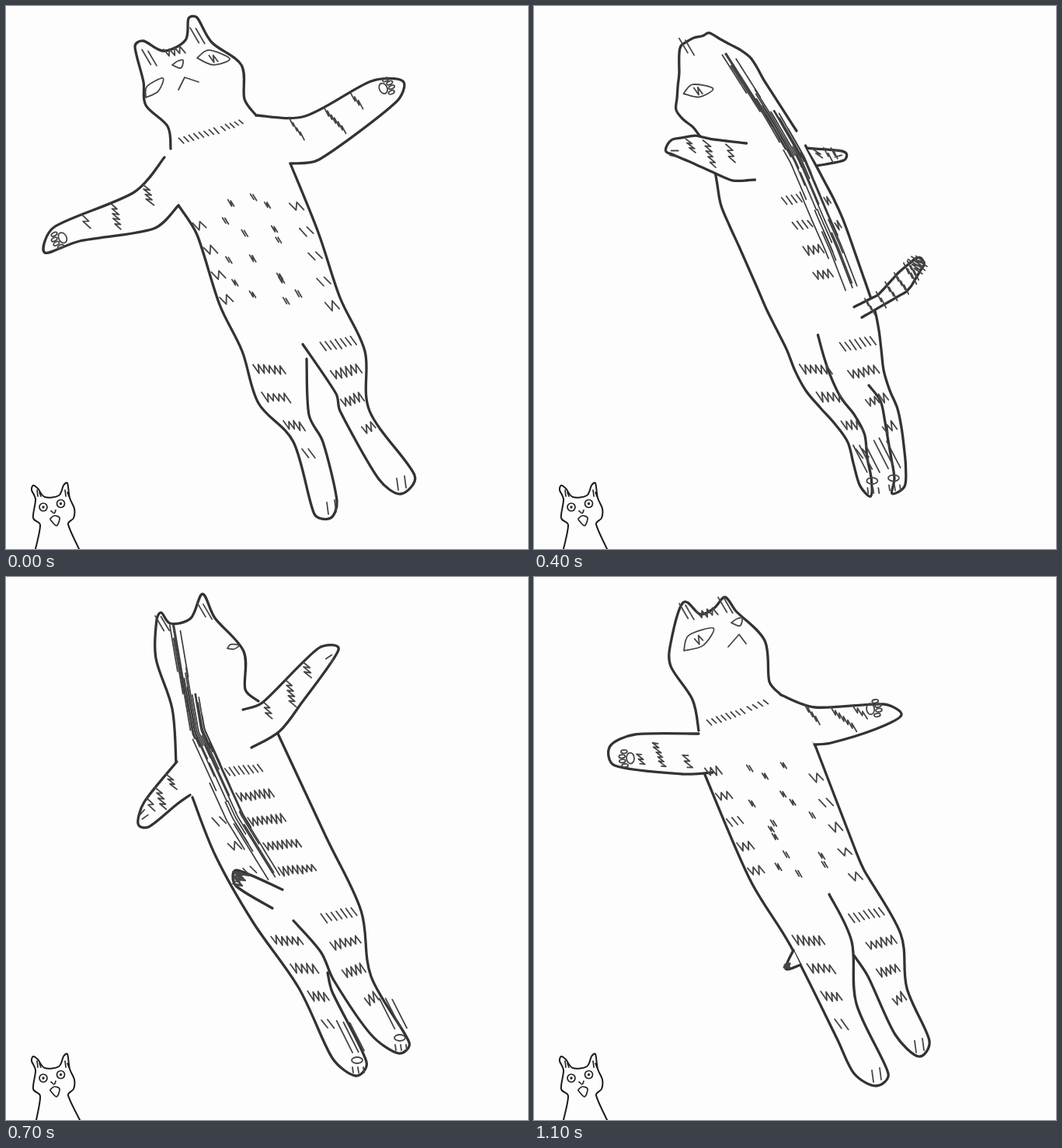
Animation of 672 by 700 pixels, one loop 1.2 s. Source, as an HTML page with a canvas:

```html
<!DOCTYPE html>
<html lang="en">
<head>
<meta charset="utf-8">
<title>Spinning cat</title>
<style>
html, body { margin: 0; width: 100%; height: 100%; overflow: hidden; background: #fefdfe; }
canvas { display: block; }
</style>
</head>
<body>
<canvas id="c" width="672" height="700"></canvas>
<script>
const ctx = document.getElementById('c').getContext('2d');
const STEP = 100, PAPER = '#fefdfe';

const pairs = s => {
  const n = s.split(' ').map(Number);
  return n.filter((_, i) => i % 2 === 0).map((x, i) => [x, n[i * 2 + 1]]);
};

// Each part is a row of points: head, left, right, armA, armB, tail, spine, eyes (ends), nose, mouth, ears.
// bands: stripe width at the left and right of the trunk; fold: side that runs back up on itself.
function pose(view, bands, parts, fold) {
  const out = { view, bands };
  for (const k in parts) out[k] = pairs(parts[k]);
  if (fold) out[fold] = out[fold].concat(out[fold].slice(-5, -1).reverse());
  return out;
}

const front = pose('front', [14, 14], {
  head: '212 184 208 155 180 128 177 98 166 52 177 45 203 58 231 44 235 16 246 15 265 47 303 76 307 120 322 141',
  armA: '322 141 385 142 470 97 511 97 502 124 403 198 366 203',
  armB: '204 195 165 240 62 285 50 318 95 303 190 287 222 257',
  left: '222 257 246 295 275 385 304 445 325 512 370 562 397 655 418 660 426 638 408 562 390 527 387 455',
  right: '366 203 402 292 430 376 462 445 468 522 526 605 508 629 480 610 430 522 425 500 382 436',
  eyes: '246 67 288 68 180 118 202 93',
  nose: '221 75',
  mouth: '222 108 230 92 248 98',
  ears: '184 66 246 38'
});

const frontLeft = pose('front', [12, 32], {
  head: '222 183 200 152 180 125 179 95 186 82 176 62 190 56 198 60 216 47 219 25 276 56 296 88 302 118 327 154',
  armA: '312 160 332 154 385 97 425 85 433 108 385 175 355 202',
  armB: '222 186 204 240 135 308 133 328 160 329 225 288 240 272',
  left: '231 257 280 362 314 430 334 515 385 570 412 635 428 651 444 635 423 562 402 498',
  right: '364 200 428 350 455 450 497 575 511 605 496 638 470 610 445 540 400 488 366 418',
  tail: '450 433 475 444 453 454',
  eyes: '216 81 270 68',
  nose: '191 94',
  mouth: '203 119 202 104 220 107',
  ears: '186 66 226 38'
});

const sideLeft = pose('side', [0, 45], {
  head: '221 158 204 157 180 140 176 125 183 110 186 78 198 63 187 27 222 43 270 53 294 95 324 146',
  armA: '297 164 255 129 226 140 246 170 272 214 291 217',
  left: '221 158 222 222 246 275 282 365 322 422 340 480 360 505 412 545 430 630 440 638 423 590 415 540 372 508 345 470 328 428',
  right: '324 146 385 260 440 388 446 480 461 512 464 590 460 632 440 639',
  tail: '442 386 500 379 585 319 595 338 540 382 444 409',
  spine: '280 66 328 152 388 286 431 374',
  eyes: '194 108 249 92',
  mouth: '194 143 204 145 212 141',
  ears: '203 44'
}, 'right');

const backLeft = pose('back', [45, 26], {
  head: '227 195 215 162 189 140 186 95 190 83 174 50 206 60 228 46 230 26 250 44 290 80 303 105 352 176',
  armA: '250 190 190 203 122 207 110 230 235 240 278 231',
  armB: '345 172 425 178 446 186 440 203 390 214 372 217',
  left: '240 240 270 320 313 408 336 485 388 543 408 620 420 642 438 625 434 550 412 490 403 420',
  right: '375 214 412 285 440 395 456 480 485 545 498 605 478 622 455 575 433 510 416 498',
  tail: '382 390 392 340 408 323 420 350 400 394',
  spine: '225 52 320 185 366 300 382 355',
  eyes: '191 118 212 121',
  ears: '189 60 239 38'
});

const backRight = pose('back', [14, 45], {
  head: '219 240 214 170 193 105 194 55 200 46 212 60 238 53 253 22 269 53 306 96 308 145 325 160',
  armA: '220 238 178 290 170 318 184 322 220 293 237 281',
  armB: '305 171 330 162 402 92 428 94 380 163 352 199 316 220',
  left: '240 284 270 360 318 445 377 530 420 620 450 643 464 625 420 535 414 510',
  right: '350 202 412 335 457 430 470 515 519 600 505 614 470 590 422 520 405 483 370 443',
  tail: '343 427 296 398 297 378 356 403',
  spine: '221 58 245 200 295 310 343 388',
  eyes: '285 92 300 88',
  ears: '201 60 255 43'
});

const sideRight = pose('side', [52, 0], {
  head: '200 160 174 113 174 90 195 52 208 10 226 42 262 50 272 65 298 76 294 102 287 121 326 165',
  armB: '235 190 238 135 260 111 276 130 288 198 277 215',
  left: '200 160 228 272 300 440 345 490 378 538 440 605 468 622 486 602',
  right: '326 165 388 285 407 370 425 420 436 460 428 522 465 580 480 608 470 575 438 525 444 465 438 430 405 380',
  tail: '314 457 275 490 160 518 152 500 255 482 297 445',
  spine: '178 90 207 200 249 325 297 435',
  eyes: '219 97 266 72',
  mouth: '277 103 284 97 294 96',
  ears: '209 36'
}, 'left');

const frontRight = pose('front', [18, 14], {
  head: '212 198 204 158 176 115 176 85 192 33 214 48 232 40 246 26 260 44 297 82 303 135 318 152',
  armA: '318 152 362 168 450 164 473 178 440 196 382 214 361 216',
  armB: '230 252 190 254 104 243 98 218 130 203 212 202',
  left: '218 250 278 390 330 475 390 595 412 640 440 656 456 640 415 550 409 470 380 409',
  right: '360 212 413 350 425 378 472 460 480 530 509 598 495 618 465 590 430 515 412 488',
  tail: '343 500 324 505 334 481',
  eyes: '193 95 231 66',
  nose: '261 58',
  mouth: '250 90 264 74 273 86',
  ears: '196 44 246 36'
});

const lerp = (a, b, f) => a.map((v, i) => v + (b[i] - v) * f);
const mid = (a, b) => lerp(a, b, .5);

// n points evenly spaced along a polyline
function resample(p, n) {
  const run = [0];
  for (let i = 1; i < p.length; i++)
    run.push(run[i - 1] + Math.hypot(p[i][0] - p[i - 1][0], p[i][1] - p[i - 1][1]));
  const total = run[run.length - 1], out = [];
  for (let i = 0, j = 1; i < n; i++) {
    const d = total * i / (n - 1);
    while (j < p.length - 1 && run[j] < d) j++;
    out.push(lerp(p[j - 1], p[j], (d - run[j - 1]) / (run[j] - run[j - 1] || 1)));
  }
  return out;
}

// pose halfway between two others; an arm only one of them shows is drawn short
function between(a, b) {
  const out = { view: a.view === 'side' ? b.view : a.view, bands: mid(a.bands, b.bands) };
  for (const k of Object.keys({ ...a, ...b })) {
    if (k in out) continue;
    const p = a[k], q = b[k];
    if (p && q) {
      const small = p.length < 3 || q.length < 3 || k === 'eyes';
      const n = small ? Math.min(p.length, q.length) : 26;
      const [u, v] = small ? [p, q] : [resample(p, n), resample(q, n)];
      out[k] = u.slice(0, n).map((pt, i) => mid(pt, v[i]));
    } else if (k.startsWith('arm')) {
      const arm = p || q, root = mid(arm[0], arm[arm.length - 1]);
      out[k] = arm.map(pt => lerp(root, pt, .5));
    }
  }
  return out;
}

const rear = between(backLeft, backRight);
delete rear.eyes;

const poses = [
  front, frontLeft, between(frontLeft, sideLeft),
  sideLeft, between(sideLeft, backLeft),
  backLeft, rear, backRight,
  between(backRight, sideRight), sideRight,
  between(sideRight, frontRight), frontRight
];

let seed;
const rnd = () => (seed = seed * 16807 % 2147483647) / 2147483647;

function pen(width, color) {
  ctx.lineWidth = width;
  ctx.strokeStyle = color;
}

function curve(p, fill) {
  ctx.beginPath();
  ctx.moveTo(...p[0]);
  for (let i = 0; i < p.length - 1; i++) {
    const a = p[i - 1] || p[i], b = p[i], c = p[i + 1], d = p[i + 2] || c;
    const len = Math.hypot(c[0] - b[0], c[1] - b[1]);
    // keep tangents short beside long neighbours so that tips stay crisp
    const pull = (u, v) => Math.min(1 / 6, .36 * len / (Math.hypot(v[0] - u[0], v[1] - u[1]) || 1));
    const f = pull(a, c), g = pull(b, d);
    ctx.bezierCurveTo(b[0] + (c[0] - a[0]) * f, b[1] + (c[1] - a[1]) * f,
      c[0] - (d[0] - b[0]) * g, c[1] - (d[1] - b[1]) * g, ...c);
  }
  if (fill) { ctx.fillStyle = PAPER; ctx.fill(); }
  ctx.stroke();
}

function tick(x, y, dx, dy) {
  ctx.beginPath();
  ctx.moveTo(x, y);
  ctx.lineTo(x + dx, y + dy);
  ctx.stroke();
}

function oval(x, y, rx, ry, turn = 0) {
  ctx.beginPath();
  ctx.ellipse(x, y, rx, ry, turn, 0, 7);
  ctx.stroke();
}

// zigzag from a to b, or a row of loose ticks
function scribble(a, b, h, loose) {
  const len = Math.hypot(b[0] - a[0], b[1] - a[1]);
  const steep = Math.abs(b[1] - a[1]) > 1.5 * Math.abs(b[0] - a[0]);
  const ox = steep ? h / 2 : h * .2, oy = steep ? h * .25 : h / 2;
  const count = 2 * Math.max(2, Math.round(len / 6));
  ctx.beginPath();
  for (let i = 0; i < count; i++) {
    const [x, y] = lerp(a, b, i / (count - 1)), s = i % 2 ? 1 : -1, r = .8 + rnd() * .4;
    if (!i || loose && s < 0) ctx.moveTo(x + ox * s * r, y + oy * s * r);
    else ctx.lineTo(x + ox * s * r, y + oy * s * r);
  }
  ctx.stroke();
}

// x where a path first crosses height y
function xAt(p, y) {
  for (let i = 1; i < p.length; i++) {
    const [a, b] = [p[i - 1], p[i]];
    if ((a[1] - y) * (b[1] - y) <= 0 && a[1] !== b[1])
      return a[0] + (b[0] - a[0]) * (y - a[1]) / (b[1] - a[1]);
  }
  return NaN;
}

function drawFur(line, w) {
  const p = resample(line, 60);
  for (let i = 0; i < 36; i++) {
    const from = Math.floor(rnd() * 50), to = Math.min(59, from + 7 + Math.floor(rnd() * 14));
    const off = (rnd() * 2 - 1) * w;
    ctx.beginPath();
    for (let j = from; j <= to; j++) ctx.lineTo(p[j][0] + off, p[j][1] - off * .4);
    ctx.stroke();
  }
}

function drawTrunk({ view, bands, left, right, spine }) {
  const band = (x, y, w) => w > 4 && x && scribble([x, y + 2], [x + w, y - w * .08], 10, rnd() < .35);
  for (let y = 250; y < 410; y += 32) {
    const l = xAt(left, y), r = xAt(right, y), [wl, wr] = bands;
    if (view === 'back') {
      const s = xAt(spine, y);
      band(Math.max(s - 16 - wl, l + 4), y, Math.min(wl, s - l - 24));
      band(s + 16, y, Math.min(wr, r - s - 22));
      continue;
    }
    const gap = view === 'side' ? 14 : 4;
    band(l + gap, y, wl);
    band(r - gap - wr, y + 8, wr);
    const lo = (l || 240) + wl + 16, hi = r - wr - 26;
    for (let i = 0; i < 3; i++) {
      const x = lo + (hi - lo) * (i + rnd()) / 3, sy = y + (rnd() - .5) * 26;
      if (view === 'front' || i !== 1) scribble([x, sy], [x + 5, sy + 1], 7, rnd() < .5);
    }
  }
}

function drawLegs({ view, left, right }) {
  [42, 36, 26, 14].forEach((w, i) => {
    const y = 434 + i * 36, r = xAt(right, y) - 8, l = xAt(left, y + 34) + 9;
    scribble([r - w, y + 6], [r, y - 3], 11, i === 0);
    if (view !== 'side') scribble([l, y + 34], [l + w * .9, y + 35], 11, i === 3);
  });
  for (const p of [left, right]) {
    if (view === 'side' && p === left) continue;
    const [x, y] = p.reduce((a, b) => b[1] > a[1] ? b : a);
    if (view === 'back') {
      oval(x + 2, y - 20, 7, 4);
      for (const d of [-4, 3, 10]) tick(x + d, y - 11, 1, 7);
      scribble([x - 16, y - 50], [x + 4, y - 50], 36, true);
    } else {
      tick(x - 5, y - 20, 2, 15);
      tick(x + 5, y - 23, 2, 15);
    }
  }
}

function drawArm(arm, view) {
  const p = resample(arm, 41), tip = p[20], root = mid(p[0], p[40]);
  const len = Math.hypot(tip[0] - root[0], tip[1] - root[1]);
  for (const i of [4, 9, 13])
    scribble(lerp(p[i], p[40 - i], .12), lerp(p[i], p[40 - i], i === 9 ? .8 : .5), 8);
  const turn = Math.atan2(tip[1] - root[1], tip[0] - root[0]);
  ctx.save();
  ctx.translate(...lerp(tip, root, 19 / len));
  ctx.rotate(turn);
  if (view === 'back') {
    tick(8, -4, 9, 1);
    tick(7, 4, 9, -1);
  } else {
    oval(-3, 0, 5, 7);
    for (const d of [-9, -3, 3, 9]) oval(9 - Math.abs(d) * .5, d, 4, 2.2);
  }
  ctx.restore();
}

function drawTail(tail) {
  const p = resample(tail, 41), [x, y] = p[20];
  const len = Math.hypot(x - p[0][0], y - p[0][1]);
  if (len > 90) for (const i of [3, 6, 9, 12]) scribble(p[i], p[40 - i], 8);
  for (let i = 15; i < 20; i++) scribble(p[i], p[40 - i], len > 40 ? 9 : 5);
}

function drawFace({ view, eyes = [], nose, mouth, ears }) {
  for (let i = 0; i + 1 < eyes.length; i += 2) {
    const [a, b] = [eyes[i], eyes[i + 1]], w = b[0] - a[0], h = b[1] - a[1];
    const side = (f, s) => [a[0] + w * f + h * s, a[1] + h * f - w * s];
    curve([a, side(.35, .25), b, side(.5, -.2), a]);
    if (w > 30) scribble(side(.4, 0), side(.6, 0), 9);
  }
  if (nose) {
    const [x, y] = nose[0];
    curve([[x - 7, y + 1], [x, y - 4], [x + 7, y - 5], [x + 4, y + 5], [x - 7, y + 1]]);
  }
  if (mouth) {
    ctx.beginPath();
    mouth.forEach(pt => ctx.lineTo(...pt));
    ctx.stroke();
  }
  for (const [x, y] of ears) scribble([x - 5, y], [x + 6, y + 1], 18, true);
  if (view === 'front' && ears[1]) {
    const [x, y] = mid(...ears);
    scribble([x - 10, y + 9], [x + 14, y + 4], 9);
  }
}

function drawCat(cat) {
  const { view, spine, head, armA, armB, tail } = cat;
  seed = 7;
  pen(1.7, '#3c3c3c');
  if (spine) drawFur(spine, view === 'side' ? 4 : 12);
  pen(3.3, '#333');
  for (const k of ['head', 'left', 'right']) curve(cat[k]);
  for (const p of [tail, armA, armB]) if (p) curve(p, true);
  pen(1.8, '#464646');
  drawFace(cat);
  drawTrunk(cat);
  drawLegs(cat);
  if (tail) drawTail(tail);
  for (const p of [armA, armB]) if (p) drawArm(p, view);
  if (view === 'front') {
    const a = head[0], b = head[head.length - 1];
    scribble([a[0] + 12, a[1] - 10], lerp(a, b, .55), 7, true);
    scribble(lerp(a, b, .6), [b[0] - 18, b[1] + 8], 6, true);
  }
}

const watcher = pairs('38 700 44 669 35 660 38 636 33 624 35 618 41 622 50 633 68 631 74 618 79 615 82 634 88 648 87 660 80 668 94 700');
const muzzle = pairs('57 661 62 657 69 660 65 670 57 662');

function drawWatcher(i) {
  const sway = [0, 1, 0, -1, 0, 0][i % 6];
  pen(2, '#1c1c1c');
  curve(watcher.map(([x, y]) => [y > 690 ? x + sway : x, y]));
  pen(1.7, '#222');
  curve(muzzle);
  curve([[58, 651], [62, 654], [64, 650]]);
  for (const x of [40, 76]) {
    tick(x, 624, 1, 8);
    tick(x + 3, 627, 2, 5);
  }
  for (const [x, y] of [[48, 646], [70.5, 641.5]]) {
    oval(x, y, 5, 5);
    oval(x, y, .8, .8);
  }
}

let start;
function frame(now) {
  start ??= now;
  const i = Math.floor((now - start) / STEP) % poses.length;
  ctx.fillStyle = PAPER;
  ctx.fillRect(0, 0, 672, 700);
  ctx.lineCap = ctx.lineJoin = 'round';
  drawCat(poses[i]);
  drawWatcher(i);
  requestAnimationFrame(frame);
}
requestAnimationFrame(frame);
</script>
</body>
</html>
```
